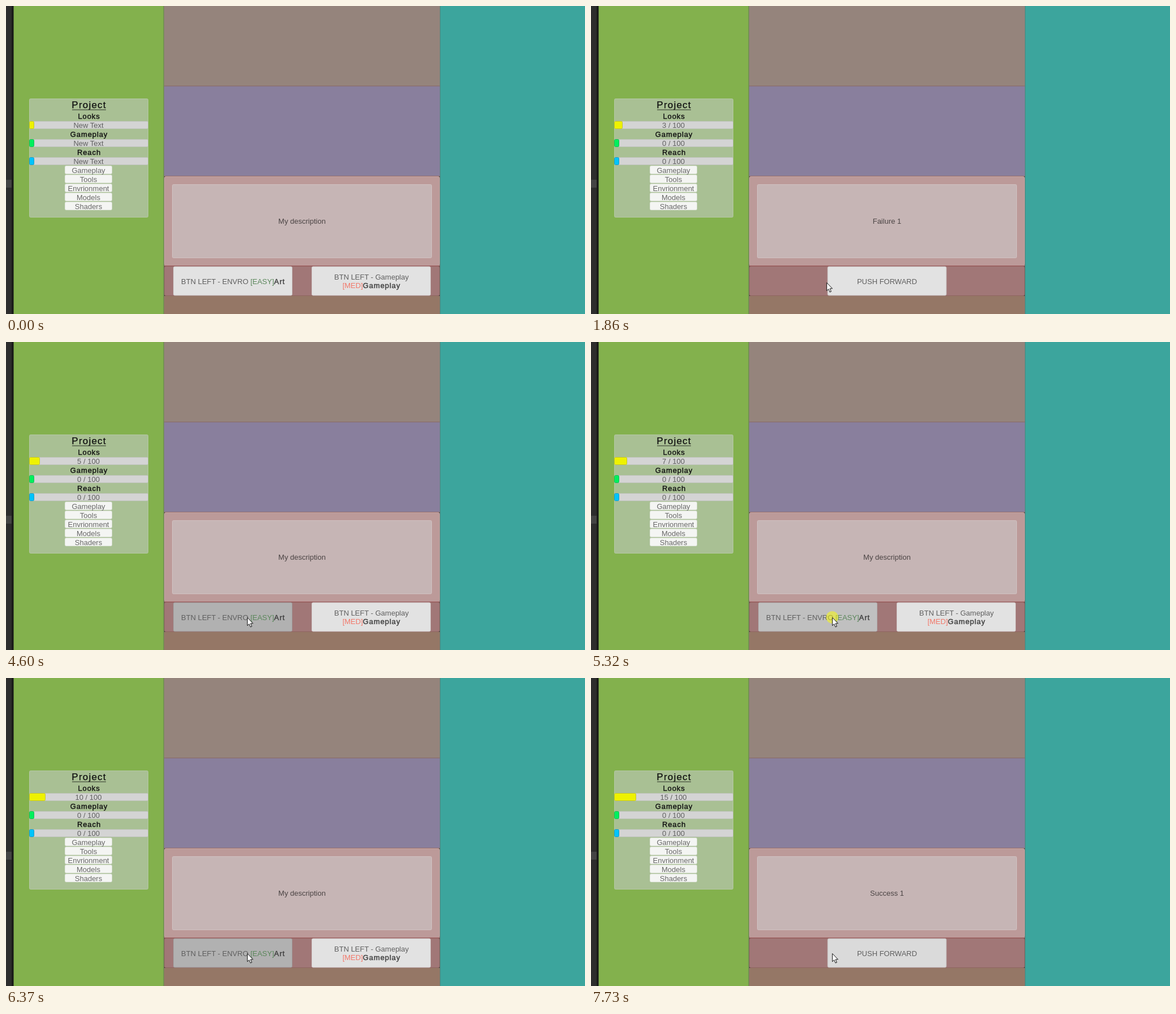
An HTML page that plays this animation: 1025 px wide and 546 px high, repeating every 8 s.

```html
<!DOCTYPE html>
<html lang="en">
<head>
<meta charset="utf-8">
<title>Project panel</title>
<style>
  html, body { margin: 0; width: 100%; height: 100%; overflow: hidden; background: #2d2d2d; }
  svg { display: block; width: 1025px; height: 546px; }
  text { font: 13px "Liberation Sans", Arial, sans-serif; text-anchor: middle; fill: #606060; white-space: pre; }
  .bold { letter-spacing: .91px; stroke-width: .45px; stroke: currentColor; fill: currentColor; }
</style>
</head>
<body>
<svg id="stage" viewBox="0 0 1025 546" xmlns="http://www.w3.org/2000/svg"></svg>
<script>
const NS = 'http://www.w3.org/2000/svg';
const stage = document.getElementById('stage');
const LOOP = 8000, HOLD = 120, FADE = 80;
const NORMAL = 226, HOVER = 218, PRESSED = 177;

function add(tag, attrs, parent = stage) {
  const el = document.createElementNS(NS, tag);
  for (const k in attrs) el.setAttribute(k, attrs[k]);
  parent.appendChild(el);
  return el;
}
const rect = (x, y, width, height, fill, parent) => add('rect', { x, y, width, height, fill }, parent);
function box(x, y, w, h, fill, stroke, parent) {
  const el = rect(x + .5, y + .5, w - 1, h - 1, fill, parent);
  el.setAttribute('rx', 2);
  el.setAttribute('stroke', stroke);
  return el;
}
function label(x, y, str, attrs = {}, parent = stage) {
  const el = add('text', { x, y, ...attrs }, parent);
  el.textContent = str;
  return el;
}
function span(parent, str, attrs = {}) {
  add('tspan', attrs, parent).textContent = str;
}
const strong = { class: 'bold', color: '#404040' };
const show = (el, on) => el.setAttribute('display', on ? 'inline' : 'none');

// Backdrop
rect(0, 0, 10, 546, '#2d2d2d');
rect(0, 308, 10, 14, '#444444');
rect(10, 0, 4, 546, '#191a18');
rect(13, 0, 1, 546, '#4c6334');
rect(14, 0, 265, 546, '#83b14d');
rect(768, 0, 257, 546, '#3ca59d');
rect(280, 0, 488, 142, '#95847c');
rect(280, 142, 488, 160, '#897f9d');
rect(280, 514, 488, 32, '#957766');
rect(280, 141, 488, 1.4, '#8d706c');
box(280, 461, 488, 53, '#a17777', '#8f6460');
box(280, 302, 488, 159, '#bc9a99', '#c2a19f');
rect(280, 301, 488, 1, '#94706f');
rect(280, 460, 488, 1.4, '#a06263');
rect(278.5, 0, 1.5, 546, '#6f8b52');
rect(768, 0, 1.2, 546, '#4c8880');
box(294, 316, 460, 131, '#c6b5b5', '#d0c1c1');
const story = label(524, 385.5, '', { style: 'fill:#4b4444' });

// Project panel
box(41, 164, 211, 211, '#a9c094', '#b5c8a4');
label(147, 181, 'Project', {
  style: 'font-size:17px;letter-spacing:1.2px;fill:#101010;stroke:#101010;stroke-width:.25px'
});
rect(117, 183.5, 60, 1, '#2c3228');
const bars = ['Looks', 'Gameplay', 'Reach'].map((name, i) => {
  const y = 204 + i * 32;
  label(147, y - 4.5, name, { class: 'bold', color: '#151515' });
  box(41, y, 211, 14, '#d4d4d4', '#bfc3bb');
  const colors = [['#eef200', '#c3c629'], ['#00f05c', '#22b958'], ['#00c4ff', '#259bbd']][i];
  return { fill: box(41, y, 9, 14, ...colors), text: label(146, y + 11.7, '') };
});
['Gameplay', 'Tools', 'Envrionment', 'Models', 'Shaders'].forEach((name, i) => {
  box(104, 283 + i * 16, 84, 15, '#f4f5f3', '#dde3d8');
  label(146, 295.5 + i * 16, name, { style: 'fill:#686868' });
});

// Choice and result buttons
const choice = add('g', {}), result = add('g', {});
const button = (x, parent) => box(x, 461.5, 211, 52, '#e2e2e2', '#d2caca', parent);
const leftBtn = button(296, choice);
button(541, choice);
const leftText = label(402, 492.5, '', {}, choice);
span(leftText, 'BTN LEFT - ENVRO ');
span(leftText, '[EASY]', { fill: '#5b875b' });
span(leftText, 'Art', strong);
label(647, 485, 'BTN LEFT - Gameplay', {}, choice);
const rightText = label(647, 499.7, '', {}, choice);
span(rightText, '[MED]', { fill: '#f2786a' });
span(rightText, 'Gameplay', strong);
const pushBtn = button(418.5, result);
label(524, 492.5, 'PUSH FORWARD', {}, result);

const halo = add('circle', { r: 10.8, fill: '#ff0', 'fill-opacity': .5 });
const arrow = add('path', {
  d: 'M.3 .5V14.8L3.5 11.8L5.8 17.2L8.2 16.2L5.9 10.9H10.3Z',
  fill: '#fff', stroke: '#111', 'stroke-width': 1
});

// Click release times; they alternate between a choice and moving on
const releases = [1860, 2750, 3260, 3720, 4110, 4370, 4620, 4820, 5010, 5200, 5390, 5540,
  5680, 5800, 5990, 6200, 6400, 6590, 6770, 6950, 7130, 7370, 7630];
const scores = [3, 4, 5, 6, 7, 8, 9, 10, 12, 13, 14, 15];
const wins = [0, 0, 1, 0, 1, 0, 1, 0, 1, 1, 1, 1];
const path = [[200, 919, 548], [810, 417, 490], [2250, 417, 490], [2480, 490, 489],
  [3400, 490, 489], [3550, 513, 489], [3720, 513, 489], [3860, 427, 488]];

const clamp = v => Math.max(0, Math.min(1, v));
const mix = (a, b, p) => a + (b - a) * p;

function pointer(t) {
  let i = 0;
  while (i < path.length - 2 && t >= path[i + 1][0]) i++;
  const [a, b] = [path[i], path[i + 1]];
  const p = clamp((t - a[0]) / (b[0] - a[0]));
  const e = p * p * (3 - 2 * p);
  return [mix(a[1], b[1], e), mix(a[2], b[2], e)];
}

function draw(t) {
  const done = releases.filter(r => r <= t).length;
  const picks = Math.ceil(done / 2);
  const onResult = done % 2 === 1;
  const score = picks ? scores[picks - 1] : 0;
  const [x, y] = pointer(t);

  bars.forEach((bar, i) => {
    const value = i ? 0 : score;
    bar.fill.setAttribute('width', 8 + 2 * value);
    bar.text.textContent = picks ? value + ' / 100' : 'New Text';
  });
  story.textContent = !onResult ? 'My description' : wins[picks - 1] ? 'Success 1' : 'Failure 1';
  show(choice, !onResult);
  show(result, onResult);

  const next = releases[done] ?? Infinity;
  const press = done ? next - HOLD : 1135;
  const haloEnd = done ? next - 30 : 1165;
  const inside = done > 0 && (onResult ? x > 418.5 : x < 507);
  const since = done === 1 ? 2265 : releases[done - 1];
  let tone = inside ? mix(NORMAL, HOVER, clamp((t - since) / FADE)) : NORMAL;
  if (t >= press) tone = mix(tone, PRESSED, clamp((t - press) / (done ? FADE : 30)));
  const c = Math.round(tone), edge = Math.round(c * .9);
  const active = onResult ? pushBtn : leftBtn;
  active.setAttribute('fill', `rgb(${c},${c},${c})`);
  active.setAttribute('stroke', `rgb(${edge},${edge - 6},${edge - 6})`);

  show(halo, t >= press && t < haloEnd);
  halo.setAttribute('cx', x);
  halo.setAttribute('cy', y);
  show(arrow, t >= 200);
  arrow.setAttribute('transform', `translate(${x} ${y})`);
}

const start = performance.now();
function tick() {
  draw((performance.now() - start) % LOOP);
  requestAnimationFrame(tick);
}
tick();
</script>
</body>
</html>
```
